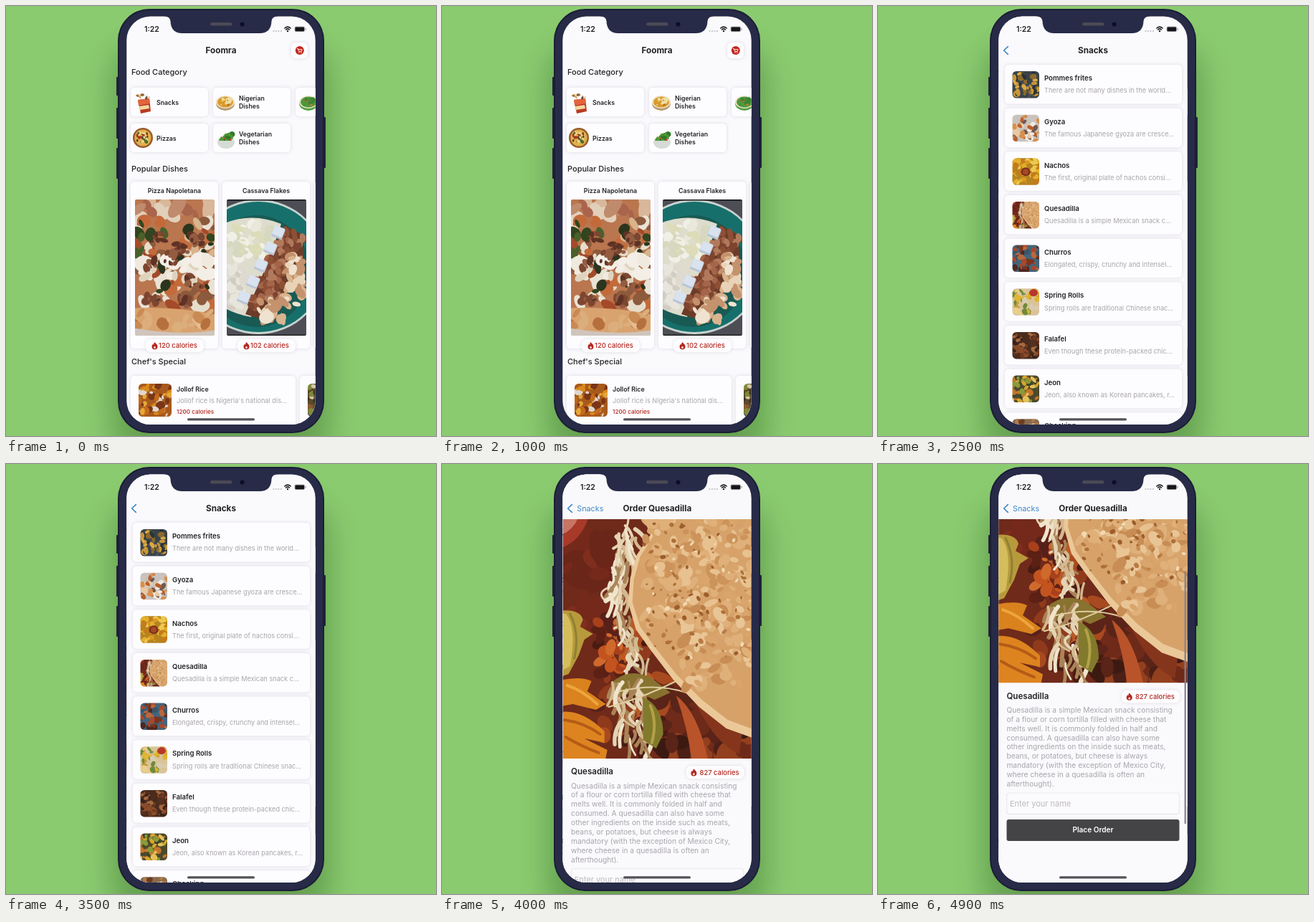
An HTML page that plays this animation: 600 px wide and 600 px high, repeating every 5 s.

```html
<!DOCTYPE html>
<html lang="en">
<head>
<meta charset="utf-8">
<title>Food ordering app</title>
<style>
html, body { margin: 0; width: 100%; height: 100%; overflow: hidden; background: #8bcb70; }
svg { display: block; width: 100vw; height: 100vh; }
text { font-family: Inter, Roboto, sans-serif; white-space: pre; }
.card { filter: drop-shadow(0 0 2.5px rgba(60, 50, 90, .15)); }
.page { filter: drop-shadow(-1px 0 3px rgba(0, 0, 0, .1)); }
</style>
</head>
<body>
<svg id="stage" viewBox="0 0 600 600"></svg>
<script>
const INK = '#232327', GREY = '#a9a6ac', RED = '#b3261e', BLUE = '#3f87c6', PAPER = '#faf9fc';
const LOOP = 5000, STEP = 100;
let clipCount = 0;

const rect = (x, y, w, h, r, fill, more = '') =>
  `<rect x="${x}" y="${y}" width="${w}" height="${h}" rx="${r}" fill="${fill}" ${more}/>`;
const card = (x, y, w, h, r = 5) => rect(x, y, w, h, r, '#fdfcfe', 'class="card"');
const oval = (x, y, rx, ry, fill, turn = 0) =>
  `<ellipse rx="${rx}" ry="${ry}" fill="${fill}" transform="translate(${x} ${y}) rotate(${turn})"/>`;
const path = (d, fill, more = '') => `<path d="${d}" fill="${fill}" ${more}/>`;
const line = (d, color, width) =>
  path(d, 'none', `stroke="${color}" stroke-width="${width}" stroke-linecap="round" stroke-linejoin="round"`);
const text = (x, y, size, weight, fill, str, more = '') =>
  `<text x="${x}" y="${y}" font-size="${size}" font-weight="${weight}" fill="${fill}" ${more}>${str}</text>`;
const centered = (x, y, size, weight, fill, str) =>
  text(x, y, size, weight, fill, str, 'text-anchor="middle"');
const group = (id, body, more = '') => `<g id="${id}" ${more}>${body}</g>`;

function random(seed) {
  let s = seed * 7919 + 17;
  const next = () => (s = (s * 16807) % 2147483647) / 2147483647;
  next();
  return next;
}

// Scatters tilted ovals over a box.
function blobs(seed, n, [x, y, w, h], size, colors) {
  const rnd = random(seed);
  return Array.from({ length: n }, () => {
    const r = size * (.5 + rnd());
    return oval((x + rnd() * w).toFixed(1), (y + rnd() * h).toFixed(1), r.toFixed(1),
      (r * (.4 + rnd() * .5)).toFixed(1), colors[Math.floor(rnd() * colors.length)], Math.round(rnd() * 180));
  }).join('');
}

// The backing spills over the edge so that the softened picture stays opaque there.
const backing = (w, h, fill) => rect(-9, -9, w + 18, h + 18, 0, fill);

function photo(x, y, w, h, r, body, scale = 1) {
  const id = 'clip' + clipCount++;
  return `<clipPath id="${id}">${rect(x, y, w, h, r, '#000')}</clipPath>
    <g clip-path="url(#${id})"><g transform="translate(${x} ${y}) scale(${scale})" filter="url(#lens)">${body}</g></g>`;
}

// ---- pictures ----
const pizzaArt = () => backing(111, 190, '#b9764f')
  + blobs(3, 16, [0, 0, 111, 24], 13, ['#d8b79a', '#c08a6c', '#a9644c', '#e2cfba'])
  + blobs(5, 70, [0, 28, 111, 122], 9, ['#c46a3a', '#a44a2a', '#e6ddcb', '#e9e2d4', '#8c5a3c', '#d7b48c'])
  + blobs(8, 24, [0, 30, 111, 115], 7, ['#33451f', '#49602b', '#2b351d'])
  + blobs(9, 26, [5, 78, 100, 45], 9, ['#efe9de', '#f3eee6', '#dfd3bd'])
  + [[30, 52], [64, 68], [85, 55], [50, 82], [82, 115], [20, 92], [65, 144], [25, 140]].map(([x, y], i) =>
      blobs(20 + i, 9, [x - 10, y - 8, 20, 16], 5, ['#7c4630', '#5e3325', '#945b41'])).join('')
  + path('M-9 152Q55 148 120 162V199H-9Z', '#d9a36f')
  + blobs(31, 22, [0, 158, 111, 20], 7, ['#e6bd90', '#c98a54', '#b6703e', '#dcae7c'])
  + path('M-9 178Q60 192 120 181V199H-9Z', '#cfc5bd');

function cassavaArt() {
  const rnd = random(12);
  let nuts = '';
  for (let i = 0; i < 110; i++) {
    const k = rnd(), side = rnd() * 32 - 10;
    nuts += oval(88 - 54 * k + side, 42 + 112 * k + side * .5, 6, 4,
      ['#8d5036', '#a5654a', '#7d452f', '#b27a5d'][i % 4], rnd() * 180);
  }
  const cubes = [[72, 46], [61, 68], [48, 92], [37, 115], [24, 137]].map(([x, y]) =>
    `<g transform="translate(${x} ${y}) rotate(22)">${rect(-8, -7, 16, 15, 1, '#b9c5d6')}${rect(-8, -8, 15, 13, 1, '#d9e2ef')}</g>`);
  return backing(111, 190, '#4d4e55')
    + oval(44, 94, 95, 94, '#c9d3cf') + oval(44, 94, 93, 91, '#176f6b') + oval(42, 100, 74, 78, '#195a54')
    + path('M-9 36Q32 16 76 34L64 70L34 164Q10 160 -9 148Z', '#dedccd')
    + blobs(14, 50, [0, 34, 62, 50], 6, ['#e9e8da', '#d6d8bf', '#f1f0e6', '#dcdcb8'])
    + blobs(15, 45, [0, 85, 26, 62], 7, ['#dedad0', '#e8e5dd', '#d2cdc2'])
    + path('M80 36L104 48L108 84L64 172L26 160Z', '#6b3c28') + nuts
    + blobs(17, 34, [80, 74, 28, 75], 7, ['#e9d3b8', '#d9b48f', '#f0e2d0', '#c4926c'])
    + blobs(18, 20, [44, 142, 42, 26], 8, ['#e9d3b8', '#d9b48f', '#f0e2d0', '#c4926c'])
    + cubes.join('') + rect(-9, -9, 130, 10.5, 0, '#111') + rect(-9, 188.5, 130, 10, 0, '#222');
}

function quesadillaArt() {
  const rnd = random(41);
  const shreds = (n, x, y, w, h, lean) => Array.from({ length: n }, () => {
    const k = rnd(), len = 14 + rnd() * 24, bend = (rnd() - .5) * 26;
    return line(`M${x + lean * k + rnd() * w} ${y + k * h}q${bend} ${len * .4} ${(rnd() - .5) * 30} ${len}`,
      ['#e5d3b3', '#d3b98f', '#f0e4cc', '#a98458'][Math.floor(rnd() * 4)], 2.5 + rnd() * 4);
  }).join('');
  return backing(264, 334, '#6f2a1a')
    + blobs(42, 30, [0, 20, 75, 140], 20, ['#75291b', '#6a2618', '#7f2e1e'])
    + path('M-9 -9H38Q26 34 -9 42Z', '#a83a2a') + path('M-9 -9H24Q16 18 -9 24Z', '#c87565')
    + blobs(43, 60, [45, 140, 100, 180], 12, ['#58201a', '#8f3a1c', '#a84a20', '#4a1b12', '#b85a26'])
    + blobs(49, 26, [48, 140, 40, 80], 8, ['#c4541f', '#a8401c', '#5c2014', '#d06a2c'])
    + blobs(44, 60, [130, 235, 134, 99], 15, ['#4c2016', '#6e2a18', '#3c1a12', '#93401f', '#5a2418'])
    + shreds(60, 80, 0, 28, 115, -24) + shreds(22, 74, 130, 30, 80, 20)
    + path('M-9 128Q24 124 28 140L24 150 42 160 30 168 22 190 8 216 -9 222Z', '#b89a3c')
    + path('M4 132Q20 150 10 205L-9 216V132Z', '#d6bd5c') + line('M10 132Q24 160 16 194', '#8c8234', 3)
    + path('M-9 226Q25 218 40 226L34 240 60 258 46 266 14 258 -9 262Z', '#d9821e')
    + path('M-9 270Q24 262 58 296L58 312 30 306 62 322 58 343H-9Z', '#dd8420')
    + line('M2 280Q30 284 52 300M4 304Q24 316 50 326', '#b45c16', 4)
    + line('M6 232Q26 238 48 258', '#eda63c', 4)
    + path('M66 230Q92 205 124 222L150 242 128 252 102 240 76 250Z', '#87722f')
    + shreds(40, 66, 222, 45, 85, 16)
    + path('M112 248Q140 262 140 300L130 320 112 308Z', '#817a2c') + line('M122 260Q132 284 124 312', '#b3a148', 4)
    + line('M64 262Q110 250 158 226M80 240Q130 228 172 242', '#decda0', 2)
    + path('M158 246Q190 270 204 343H180Q176 296 158 246Z', '#b9532a')
    + path('M186 258Q224 288 250 300L246 328Q212 312 186 258Z', '#85351c')
    + path('M110 -9L122 22 103 50 94 82 91 116 102 154 122 182 154 224 190 262 228 292 273 308V-9Z', '#ebc898')
    + path('M114 -9L126 24 108 52 99 84 97 116 108 150 128 178 158 216 194 252 230 280 273 296V-9Z', '#d6a26a')
    + blobs(46, 190, [114, 0, 150, 150], 8, ['#dfb07a', '#e8c190', '#cc935a', '#d9a56c'])
    + blobs(47, 90, [165, 125, 99, 110], 8, ['#dfb07a', '#e9c596', '#c88d54', '#d9a56c'])
    + blobs(48, 110, [112, 4, 148, 190], 2.8, ['#ad6f37', '#b87b44', '#f2d9b2', '#9d5e2c']);
}

const thumb = (x, y, size, seed, bg, colors, r = 5.5) =>
  photo(x, y, size, size, r, backing(size, size, bg) + blobs(seed, 44, [0, 2, size, size - 3], size / 10, colors));

const snackIcon = path('M184 131l16-2 2 18-14 3z', '#b93a22') + path('M184 131l16-2 1 7-16 3z', '#e2643c')
  + path('M186 140l13-2 1 5-13 2z', '#f3d9a0')
  + blobs(61, 9, [183, 121, 17, 8], 1.8, ['#584438', '#9a6b3e', '#c9a15a']);
const bowlIcon = (x, y, dish, colors) => oval(x, y + 2, 13, 10, dish) + oval(x, y, 13, 9, '#eee2c4')
  + oval(x, y, 11, 7.5, colors[0]) + blobs(63, 16, [x - 7, y - 4, 14, 8], 2.6, colors);
const pizzaIcon = oval(191, 184, 14, 14, '#9a5a2a') + oval(191, 184, 11.5, 11.5, '#e0b04c')
  + blobs(65, 30, [183, 176, 16, 16], 2, ['#a83424', '#4f6b2c', '#f0d488', '#5a3622']);
const saladIcon = oval(307, 190, 12, 8.5, '#e1e4df')
  + blobs(66, 24, [299, 178, 16, 11], 3.2, ['#4f9a35', '#7cbc45', '#2f7a2c', '#d8402c'])
  + path('M295 188h24q-1 11-12 11t-12-11z', '#d5dbd5');

const flame = (x, y) => path('M0-5C1-3 4-2 4 1.2A4 4 0 0 1-4 1.2C-4-.4-3-1.8-2.2-2.6Q-2-1.3-1.2-1.2C-1.5-2.7-.9-4 0-5Z', RED,
  `transform="translate(${x} ${y})"`) + oval(x, y + 2.4, 1.3, 1.6, '#fbeeee');
const calories = (x, y, n, gap = 0) => card(x, y - 9, 81, 18, 7) + flame(x + 12.5 - gap, y)
  + text(x + 18 + gap / 2, y + 3.4, 9.4, 500, RED, n + ' calories');

// ---- pages ----
const dish = (x, name, art, n) => card(x, 245, 122, 233)
  + centered(x + 61, 261, 8.85, 600, INK, name) + photo(x + 6, 270, 111, 190, 2, art) + calories(x + 21, 474, n);
const heading = (y, str) => text(175, y, 11, 500, INK, str);
const category = (x, y, ...lines) => card(x, y, 108, 40) + lines.map((str, i) =>
  text(x + 36, y + (lines.length > 1 ? 18.3 : 23.5) + i * 10.6, 8.75, 600, INK, str)).join('');

const home = heading(96, 'Food Category')
  + category(174, 114, 'Snacks') + snackIcon
  + category(289, 114, 'Nigerian', 'Dishes') + bowlIcon(306, 134, '#b59a72', ['#d99a2b', '#e9bd4e', '#b5651d', '#f0dca0'])
  + category(174, 164, 'Pizzas') + pizzaIcon
  + category(289, 164, 'Vegetarian', 'Dishes') + saladIcon
  + category(404, 114) + bowlIcon(422, 134, '#57a044', ['#4c9a3c', '#c8502c', '#d8762f', '#3c8434'])
  + heading(231, 'Popular Dishes')
  + dish(174, 'Pizza Napoletana', pizzaArt(), 120) + dish(302, 'Cassava Flakes', cassavaArt(), 102)
  + card(430, 245, 122, 233)
  + heading(500, "Chef's Special")
  + card(174, 516, 230, 75) + thumb(185, 527, 46, 71, '#a85a1c', ['#d98a1e', '#e3a83a', '#7a3616', '#e0d6cc', '#c46a1a'])
  + text(238, 538, 8.85, 600, INK, 'Jollof Rice')
  + text(238, 554, 9.2, 400, GREY, "Jollof rice is Nigeria's national dis...")
  + text(238, 568.6, 8.2, 500, RED, '1200 calories')
  + card(410, 516, 230, 75) + thumb(421, 527, 46, 72, '#5c4a2c', ['#7d8a3a', '#8a5a30', '#d5c8a8', '#3c3020']);

const snacks = [
  ['Pommes frites', 'There are not many dishes in the world...', '#39434a', ['#c99636', '#dba945', '#50555a', '#2b3338', '#8c6a2c']],
  ['Gyoza', 'The famous Japanese gyoza are cresce...', '#c9c2bd', ['#d98f4c', '#b9602c', '#e8c9a4', '#efe9e2', '#6e5a50']],
  ['Nachos', 'The first, original plate of nachos consi...', '#b5831f', ['#e3b02c', '#d99a20', '#efc850', '#c47a1c']],
  ['Quesadilla', 'Quesadilla is a simple Mexican snack c...'],
  ['Churros', 'Elongated, crispy, crunchy and intensel...', '#44647a', ['#7a3420', '#4c2820', '#a8482c', '#39566a', '#b8683c']],
  ['Spring Rolls', 'Spring rolls are traditional Chinese snac...', '#d9c49a', ['#e0b42e', '#e9cf8a', '#c9a040', '#6f8a3a', '#d9cbb0']],
  ['Falafel', 'Even though these protein-packed chic...', '#4a2c1e', ['#6e3a20', '#8a4c2a', '#3a2218', '#a56a40', '#54301f']],
  ['Jeon', 'Jeon, also known as Korean pancakes, r...', '#4c4a2c', ['#d9a52c', '#8a9a3a', '#c4762a', '#e3c25a', '#39402a']],
  ['Chocking', '', '#8a6a4c', ['#6a3c24', '#b07a4a', '#d9c4a8']],
];
const list = snacks.map(([name, about, bg, colors], i) => {
  const y = 82 + i * 60.65;
  let pic = bg ? thumb(187.5, y + 9, 37.5, 80 + i, bg, colors) : photo(187.5, y + 9, 37.5, 37.5, 5.5, quesadillaArt(), .143);
  if (name === 'Nachos') pic += oval(206, y + 28, 6.5, 6, '#7c2e1c') + oval(206, y + 28, 4, 4, '#a24a26');
  if (name === 'Spring Rolls') pic += oval(217, y + 15, 6, 5, '#b8382a');
  return card(177, y, 247, 54.5) + pic + text(232, y + 22.2, 9.6, 600, INK, name)
    + text(232, y + 39.4, 9.2, 400, GREY, about);
}).join('');

const story = ['Quesadilla is a simple Mexican snack consisting', 'of a flour or corn tortilla filled with cheese that',
  'melts well. It is commonly folded in half and', 'consumed. A quesadilla can also have some',
  'other ingredients on the inside such as meats,', 'beans, or potatoes, but cheese is always',
  'mandatory (with the exception of Mexico City,', 'where cheese in a quesadilla is often an', 'afterthought).'];
const detail = photo(168, 77, 264, 334, 0, quesadillaArt())
  + text(179.4, 433.4, 11.6, 600, INK, 'Quesadilla') + calories(340, 430.3, 827, 1.8)
  + story.map((str, i) => text(179.4, 452.6 + i * 12.88, 10.22, 400, GREY, str)).join('')
  + rect(179.5, 564.5, 241, 30, 4, '#dcdadf') + rect(180.1, 565, 239.8, 28.7, 3.6, '#fbfafc')
  + text(184, 583.6, 11, 400, '#bdbac0', 'Enter your name')
  + rect(179.5, 601.7, 241, 30, 3, '#444446') + centered(300, 620.2, 10.1, 600, '#fff', 'Place Order');

const backdrop = rect(168, 14, 264, 571, 0, PAPER);
const dim = id => rect(168, 14, 264, 571, 0, '#000', `id="${id}" opacity="0"`);
const title = (id, str) => group(id, centered(300, 66.1, 11.7, 700, INK, str));
const cart = card(398, 51, 23, 22, 6) + oval(409.8, 62, 6, 6, '#c4241c')
  + line('M406.3 59.6h1.3l1 3.8h3.6l.9-2.8h-4.8', '#fff', .9) + oval(409, 65, .7, .7, '#fff') + oval(412, 65, .7, .7, '#fff');
const rays = Array.from({ length: 8 }, (_, i) =>
  `<path d="M0-7.5V-14" stroke="#77757a" stroke-opacity="${.2 + i * .09}" stroke-width="4" stroke-linecap="round" transform="rotate(${i * 45})"/>`).join('');
const buttons = [[154, 99, 26], [154, 142, 43], [154, 198, 43], [442, 155, 71]].map(([x, y, h]) => rect(x, y, 4, h, 1, '#20223c')).join('');

document.getElementById('stage').innerHTML = `
  <defs>
    <filter id="soft" x="-50%" y="-20%" width="200%" height="140%"><feGaussianBlur stdDeviation="21"/></filter>
    <filter id="lens"><feGaussianBlur stdDeviation=".6"/></filter>
    <clipPath id="screen">${rect(168.3, 14.5, 263.4, 569.5, 33, '#000')}</clipPath>
  </defs>
  ${rect(0, 0, 600, 600, 0, '#8bcb70')}
  ${rect(147, 55, 306, 580, 45, '#2d6323', 'opacity=".4" filter="url(#soft)"')}
  ${buttons}
  ${rect(156, 4, 288, 592, 44, '#1b1d36')}${rect(158, 6, 284, 588, 42, '#282b47')}
  <g clip-path="url(#screen)">
    ${group('home', backdrop + home + dim('homeDim'))}
    ${group('list', backdrop + list + dim('listDim'), 'class="page"')}
    ${group('detail', backdrop + group('scroll', detail) + rect(168, 14, 264, 63, 0, '#f9f9fb')
      + rect(427.6, 77, 2.2, 352, 1, '#86848a', 'id="bar"'), 'class="page"')}
    ${title('homeTitle', 'Foomra')}${title('listTitle', 'Snacks')}${title('detailTitle', 'Order Quesadilla')}
    ${group('cart', cart)}
    ${group('chevron', line('M181.3 56.6L175.6 62L181.3 67.4', BLUE, 1.7))}
    ${group('back', text(188, 66, 10.8, 400, BLUE, 'Snacks'))}
    ${group('hud', rect(265, 266, 68, 68, 6, '#f1f0f3') + `<g transform="translate(299 299)">${group('spinner', rays)}</g>`)}
    ${text(193, 36, 10.5, 600, '#1d1d20', '1:22')}
    ${[373.5, 377, 380.5, 384].map(x => oval(x, 35, .9, .9, '#b4b2b8')).join('')}
    ${line('M388.8 31q4.2-3.8 8.4 0M390.5 33q2.5-2.2 5 0', '#1d1d20', 1.5)}${oval(393, 35, 1.2, 1.2, '#1d1d20')}
    ${rect(402.6, 28.6, 14.4, 7.4, 2, '#a9a8ad')}${rect(403.5, 29.4, 12.6, 5.8, 1.3, '#161618')}${rect(417.6, 31, 1, 2.8, .5, '#88868c')}
    ${rect(253, 575.2, 94, 3.4, 1.7, '#545158')}
  </g>
  ${path('M220 14Q229 14.5 229.5 21Q230 38 246 38H354Q370 38 370.5 21Q371 14.5 380 14Z', '#282b47')}
  ${rect(285, 23, 30.5, 4.6, 2.3, '#4b4a55')}${oval(329.5, 25.5, 3, 3, '#0c0f24')}`;

// ---- motion ----
const el = id => document.getElementById(id);
const clamp = v => Math.min(1, Math.max(0, v));
const move = (id, x, y = 0) => el(id).setAttribute('transform', `translate(${x} ${y})`);
const fade = (id, v) => el(id).setAttribute('opacity', clamp(v));

// Critically damped push, settled after half a second.
function push(ms) {
  const k = .01826 * ms;
  return ms <= 0 ? 0 : ms >= 500 ? 1 : 1 - (1 + k) * Math.exp(-k);
}

function draw(t) {
  const p = push(t - 1467), q = push(t - 3550);
  move('home', -79 * p);
  move('list', 264 * (1 - p) - 79 * q);
  move('detail', 264 * (1 - q));
  fade('homeDim', .08 * p);
  fade('listDim', .08 * q);
  el('list').style.display = p > 0 ? '' : 'none';
  el('detail').style.display = q > 0 ? '' : 'none';

  move('homeTitle', -82 * p);
  fade('homeTitle', 1 - p * p);
  fade('cart', 1 - p * p);
  move('listTitle', 168 * (1 - p) - 94 * q);
  fade('listTitle', (1 - (1 - p) ** 2) * (1 - q));
  move('detailTitle', 168 * (1 - q));
  fade('detailTitle', 1 - (1 - q) ** 2);
  fade('chevron', p * 1.5);
  move('back', 94 * (1 - q));
  fade('back', q * q);

  fade('hud', Math.min((t - 1467) / 50, (1800 - t) / 250));
  el('spinner').setAttribute('transform', `rotate(${Math.floor(t / 100) * 45 - 90})`);

  const offset = 105.7 * (1 - (1 - clamp((t - 4050) / 650)) ** 3);
  move('scroll', 0, -offset);
  move('bar', 0, offset * .692);
  fade('bar', (t - 4050) / 150);
}

function tick() {
  draw(Math.floor(performance.now() % LOOP / STEP) * STEP);
  requestAnimationFrame(tick);
}
tick();
</script>
</body>
</html>
```
